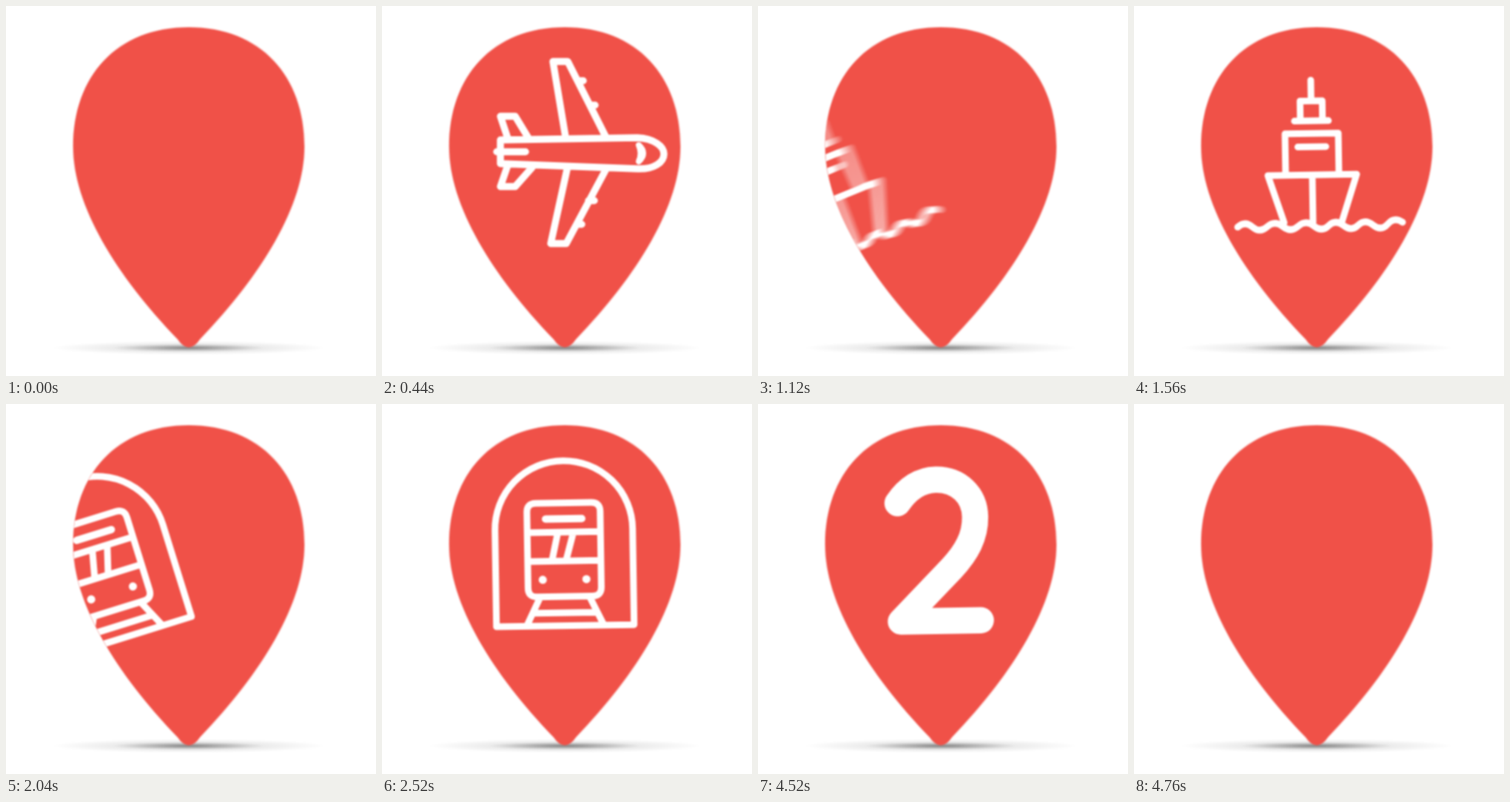
An HTML page with a canvas that plays this animation: 500 by 500 pixels, repeating every 4800 ms.

```html
<!DOCTYPE html>
<html lang="en">
<head>
<meta charset="utf-8">
<title>Map pin</title>
<style>
  html, body { margin: 0; width: 100%; height: 100%; overflow: hidden; background: #fff; }
  canvas { display: block; width: 100%; height: 100%; filter: blur(.8px); }
</style>
</head>
<body>
<canvas id="stage" width="500" height="500"></canvas>
<script>
const SIZE = 500, LOOP = 4800, STEP = 40;
const PIVOT = { x: 258, y: 605 };
const RED = '#f05148';

const ctx = document.getElementById('stage').getContext('2d');
const layer = document.createElement('canvas');
layer.width = layer.height = SIZE;
const layerCtx = layer.getContext('2d');

const pin = new Path2D(
  'M91 190C91 95 150 29 247 29C344 29 403 95 403 190' +
  'C403 270 344 365 262 450Q247 472 232 450C150 365 91 270 91 190Z');

// Swing angles in degrees, one per step away from rest; beyond the end the icon is hidden.
const FAST = [0, 0.9, 2.1, 0.9, -6.5, -17.3, -31, -46, -62];
const SLOW = [0, 0.3, 1, 1.6, 0.6, -6, -13, -22, -34, -47, -62];

// Each stroke is [line width, path]; "lean" corrects the tilt the path is drawn with.
const icons = [
  {
    arrive: 520, leave: 640, swing: SLOW, lean: -1,
    strokes: [
      [9.5, 'M160 181L345 178C368 179 381 190 381 200C381 211 368 221 345 220L160 213Z' +
            'M248 177L231 75H251L302 176M250 221L228 321H249L302 222' +
            'M170 179L160 149H180L197 177M170 215L160 244H180L203 218' +
            'M155 197H194M265 101H272M281 134H288M279 263H287M263 295H270'],
      [8, 'M347 188Q359 199 347 210Q352 199 347 188Z']
    ]
  },
  {
    arrive: 1400, leave: 1520, swing: SLOW, blur: 0.16,
    strokes: [
      [9, 'M187 228H307L286 292M187 228L208 292M247 228V292' +
          'M211 228V172H283V228M224 155H270M228 190H266' +
          'M232 155V128H262V155M247 128V100' +
          'M145 297q10 -9 20 0t20 0t21 0t21 0t21 0t20 0t20 0t20 0t20 0t20 -1t20 -2']
    ]
  },
  {
    arrive: 2240, leave: 2400, swing: FAST,
    strokes: [
      [9, 'M159.5 299.5V169.5A93 93 0 0 1 345.5 169.5V299.5Z' +
          'M215 133.5H290Q302 133.5 302 145.5V248Q302 260 290 260H215Q203 260 203 248V145.5Q203 133.5 215 133.5Z' +
          'M203 173H302M203 212H302M244 175L236 211M265 175L255 211' +
          'M218 263L201 298M287 263L304 298M211 282H294'],
      [10, 'M228 155H277'],
      [11, 'M223 237h.01M282 237h.01']
    ]
  },
  {
    arrive: 3120, leave: 4480, swing: FAST,
    strokes: [
      [35.5, 'M196 133C210 113 228 102 248 102C279 102 300.5 124 300.5 153' +
             'C300.5 180 288 201 268 222L198 293H306']
    ]
  }
];
for (const icon of icons)
  icon.strokes = icon.strokes.map(([width, d]) => [width, new Path2D(d)]);

function swingAngle(keys, steps) {
  if (steps <= 0) return 0;
  if (steps >= keys.length - 1) return null;
  const i = Math.floor(steps);
  return keys[i] + (keys[i + 1] - keys[i]) * (steps - i);
}

function iconAngle(icon, time) {
  if (time <= icon.arrive) return swingAngle(icon.swing, (icon.arrive - time) / STEP);
  const angle = swingAngle(FAST, (time - icon.leave) / STEP);
  return angle === null ? null : -angle;
}

function strokeIcon(icon, angle, alpha) {
  const c = layerCtx;
  c.save();
  c.translate(PIVOT.x, PIVOT.y);
  c.rotate((angle + (icon.lean || 0)) * Math.PI / 180);
  c.translate(-PIVOT.x, -PIVOT.y);
  c.globalAlpha = alpha;
  c.globalCompositeOperation = 'lighter';
  c.strokeStyle = '#fff';
  c.lineCap = c.lineJoin = 'round';
  for (const [width, path] of icon.strokes) {
    c.lineWidth = width;
    c.stroke(path);
  }
  c.restore();
}

// Motion blur sums evenly weighted poses around the current time.
function drawIcon(icon, time) {
  const angle = iconAngle(icon, time);
  if (angle === null) return;
  const spread = (icon.blur || 0) * STEP;
  const before = iconAngle(icon, time - spread) ?? angle;
  const after = iconAngle(icon, time + spread) ?? angle;
  const samples = Math.abs(after - before) > 0.5 ? 16 : 1;
  layerCtx.clearRect(0, 0, SIZE, SIZE);
  for (let i = 0; i < samples; i++) {
    const mix = (i + 0.5) / samples;
    strokeIcon(icon, before + (after - before) * mix, 1 / samples);
  }
  ctx.drawImage(layer, 0, 0);
}

function drawShadow() {
  const glow = ctx.createRadialGradient(0, 0, 0, 0, 0, 185);
  glow.addColorStop(0, 'rgba(0,0,0,.5)');
  glow.addColorStop(0.25, 'rgba(0,0,0,.3)');
  glow.addColorStop(0.55, 'rgba(0,0,0,.08)');
  glow.addColorStop(1, 'rgba(0,0,0,0)');
  ctx.save();
  ctx.translate(247, 462);
  ctx.scale(1, 0.05);
  ctx.fillStyle = glow;
  ctx.fillRect(-185, -185, 370, 370);
  ctx.restore();
}

function draw(now) {
  const time = Math.floor((now % LOOP) / STEP) * STEP;
  ctx.fillStyle = '#fff';
  ctx.fillRect(0, 0, SIZE, SIZE);
  drawShadow();
  ctx.strokeStyle = 'rgba(240,81,72,.35)';
  ctx.lineWidth = 2;
  ctx.stroke(pin);
  ctx.fillStyle = RED;
  ctx.fill(pin);
  ctx.save();
  ctx.clip(pin);
  for (const icon of icons) drawIcon(icon, time);
  ctx.restore();
}

const start = performance.now();
function tick() {
  draw(performance.now() - start);
  requestAnimationFrame(tick);
}
tick();
</script>
</body>
</html>
```
